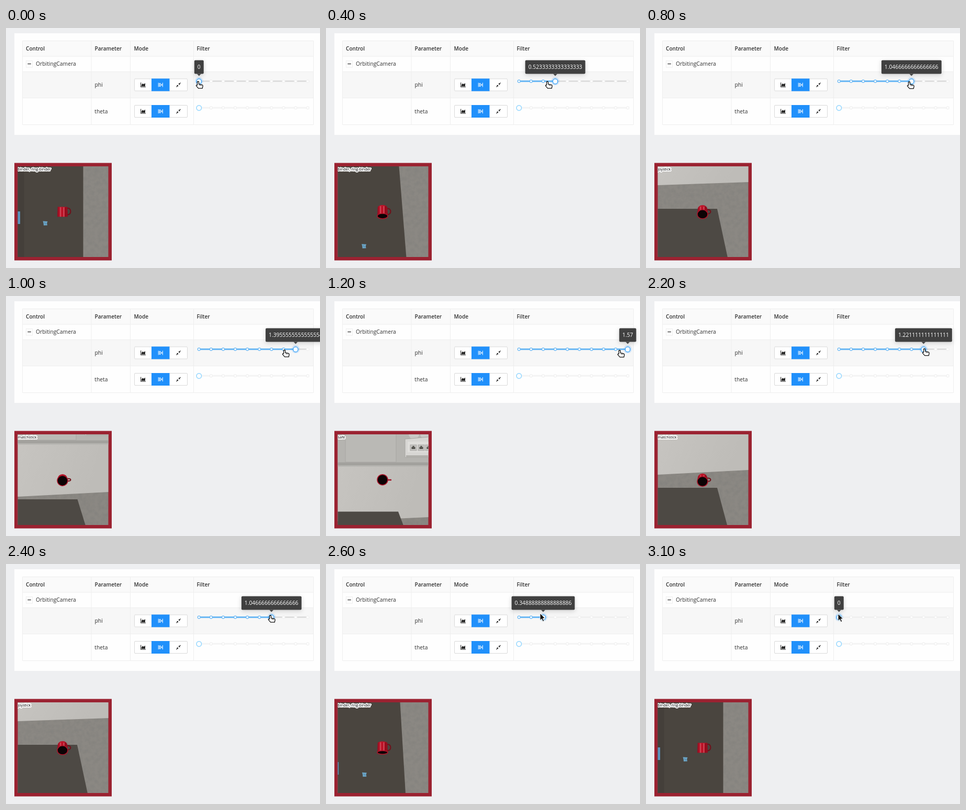
Recreate the animation shown at these times as an HTML page. Size 600x458 px, loop 3200 ms.

```html
<!DOCTYPE html>
<html lang="en">
<head>
<meta charset="utf-8">
<title>Orbiting camera filter</title>
<style>
  html, body { margin: 0; width: 100%; height: 100%; overflow: hidden; background: #eeeff1; }
  svg { display: block; width: 600px; height: 458px; }
  text { font: 10.3px "Open Sans", "Noto Sans", sans-serif; fill: #303030; }
  .head { font-size: 10.1px; font-weight: 600; }
  .tip { fill: #fff; text-anchor: middle; }
  .label { font-size: 7.2px; fill: #000; stroke: #fff; stroke-width: 3.6px; stroke-linejoin: round; paint-order: stroke; }
</style>
</head>
<body>
<svg id="stage" viewBox="0 0 600 458">
  <defs>
    <clipPath id="view"><rect x="22.5" y="264" width="173" height="173"/></clipPath>
    <filter id="grain" x="0" y="0" width="100%" height="100%">
      <feTurbulence type="fractalNoise" baseFrequency=".13" numOctaves="3" seed="4"/>
      <feColorMatrix values="0 0 0 0 .2  0 0 0 0 .2  0 0 0 0 .19  1.6 0 0 0 -.62"/>
    </filter>
    <filter id="shadow" x="-40%" y="-40%" width="180%" height="200%">
      <feDropShadow dx="0" dy="2.5" stdDeviation="4" flood-opacity=".16"/>
    </filter>
    <linearGradient id="wall" x1="0" x2="1" y1="0" y2=".4">
      <stop offset="0" stop-color="#c8c6c2"/><stop offset="1" stop-color="#bebcb8"/>
    </linearGradient>
    <linearGradient id="mug">
      <stop offset="0" stop-color="#8f0d20"/><stop offset=".3" stop-color="#c3162b"/>
      <stop offset=".7" stop-color="#b51326"/><stop offset="1" stop-color="#8a0c1d"/>
    </linearGradient>
  </defs>
  <g id="page"></g>
  <g id="phi"></g>
  <g id="photo" clip-path="url(#view)"></g>
  <g id="tip" filter="url(#shadow)">
    <rect id="tipBox" y="61.5" height="26" rx="2" fill="#404040"/>
    <path id="tipArrow" fill="#404040"/>
    <text id="tipText" class="tip" y="77.9"></text>
  </g>
  <g id="cursor"></g>
</svg>
<script>
const $ = id => document.getElementById(id);
const FRAME = 100, LOOP = 3200;
const X0 = 368.8, GAP = 23.08, STEP = 0.17444444444444443;

// Slider position for every tenth of a second
const STEPS = '00123345678899999999987664211000';
// Pointer path: time, x, y
const PATH = [
  [0, 367, 102], [100, 369, 102], [600, 459, 102], [800, 503, 102.5], [1200, 561, 103.5],
  [1500, 594, 107], [1700, 595, 108], [2000, 578, 107], [2200, 532, 100.5],
  [2400, 505, 98], [2600, 409, 94], [2900, 367, 95], [3200, 367, 95]
];

const rect = (x, y, w, h, fill, more = '') =>
  `<rect x="${x}" y="${y}" width="${w}" height="${h}" fill="${fill}" ${more}/>`;
const path = (d, fill, more = '') => `<path d="${d}" fill="${fill}" ${more}/>`;
const line = (d, color, w = 1) => path(d, 'none', `stroke="${color}" stroke-width="${w}"`);
const oval = (x, y, rx, ry, fill, more = '') =>
  `<ellipse cx="${x}" cy="${y}" rx="${rx}" ry="${ry}" fill="${fill}" ${more}/>`;
const text = (x, y, s, cls = '') => `<text x="${x}" y="${y}" class="${cls}">${s}</text>`;

function modeButtons(y) {
  const m = y + 12;
  return rect(245.5, y + .5, 101, 23, '#fff', 'rx="1.5" stroke="#d9d9d9"') +
    rect(278, y, 34.5, 24, '#2090fb') +
    line(`M257.7 ${m - 4.5}V${m + 4}H267`, '#222', 1.1) +
    path(`M259 ${m + 2.8}V${m}L261.3 ${m - 2.8}L263.3 ${m - 1}L266 ${m - 3.4}V${m + 2.8}Z`, '#222') +
    line(`M291.3 ${m - 4}V${m + 4}M299.3 ${m - 4}V${m + 4}M293.3 ${m - 3}H295V${m + 3}H293.3Z` +
      `M296.2 ${m}H298.6M297.4 ${m - 1.8}V${m + 1.8}`, '#fff', 1) +
    line(`M333.5 ${m - 4}L330.6 ${m - 1.1}M325.5 ${m + 4}L328.4 ${m + 1.1}`, '#222', 1.2) +
    path(`M330 ${m - 3.6}V${m - .5}H333.1ZM329 ${m + 3.6}V${m + .5}H325.9Z`, '#222');
}

function slider(y, k, rail, track, handle, halo) {
  let s = rect(X0, y - 1.5, 9 * GAP, 3, rail, 'rx="1.5"') +
    rect(X0, y - 1.5, k * GAP, 3, track);
  for (let i = 0; i < 10; i++) {
    const on = k > 0 && i <= k;
    s += oval(X0 + i * GAP, y, 2.5, 2.5, '#fff', `stroke="${on ? track : '#f0f0f0'}" stroke-width="1.3"`);
  }
  const x = X0 + k * GAP;
  if (halo) s += oval(x, y, 8, 8, '#1890ff', 'opacity=".15"');
  return s + oval(x, y + .3, 4.7, 4.9, '#fff', `stroke="${handle}" stroke-width="1.5"`);
}

function drawPage() {
  const heads = [[38, 'Control'], [169.5, 'Parameter'], [244.5, 'Mode'], [364.5, 'Filter']];
  $('page').innerHTML =
    rect(0, 0, 600, 458, '#eeeff1') +
    rect(16, 10, 584, 194, '#fefefe') +
    rect(31, 25, 557, 29, '#fafafa') +
    '<rect id="row" x="31" y="84" width="557" height="50"/>' +
    line('M31.5 24.5H587.5V184.5H31.5ZM31 54H588M31 83.5H588M31 133.5H588M163 24V184M237.5 24V184M358.5 24V184', '#eeeeee') +
    heads.map(([x, s]) => text(x, 42.8, s, 'head')).join('') +
    rect(38.5, 62.5, 12, 12.5, '#fff', 'stroke="#eeeeee"') +
    line('M41.3 68.5H47.8', '#222', 1.2) +
    text(57, 72.3, 'OrbitingCamera') +
    text(169.5, 112.4, 'phi') + text(169.3, 162.6, 'theta') +
    modeButtons(96.5) + modeButtons(147) +
    slider(152.3, 0, '#f4f4f4', '#91d5ff', '#91d5ff') +
    rect(16, 257.5, 186, 186, '#9b2231');
}

function mug(k) {
  const a = k * STEP, up = 9.5 * Math.cos(a), ry = 10 * Math.sin(a);
  const top = 350.7 - up, rim = 350.7 + up, x = 108;
  let s = k > 8
    ? line('M117 351H125', '#a11226', 2.6)
    : oval(118.5, 351 - up * .1, 5, 1.5 + up * .5, 'none', 'stroke="#701019" stroke-width="2"');
  s += path(`M${x - 9.3} ${top}A9.3 ${ry * .93} 0 0 1 ${x + 9.3} ${top}` +
    `L${x + 10} ${rim}A10 ${ry} 0 0 1 ${x - 10} ${rim}Z`, 'url(#mug)');
  if (k < 8) for (const dx of [-4, 2.5, 6]) {
    s += line(`M${x + dx} ${top + 1 - ry * .7}V${rim - ry * .6}`, dx > 5 ? '#5f0812' : '#e0949b', .8);
  }
  return s + oval(x, rim, 10, ry, '#0c0305', 'stroke="#ad1429" stroke-width="1.5"');
}

// Wall fittings, placed as seen from straight above
function fittings(k) {
  const socket = x => rect(x, 284, 12, 11, '#c3c2bf', 'stroke="#a09f9c" stroke-width=".8"') +
    path(`M${x + 2.5} 292V288H${x + 4.5}V286H${x + 7.5}V288H${x + 9.5}V292Z`, '#55544f');
  return `<g transform="translate(0 ${(k - 9) * 42})">` +
    rect(22, 200, 174, 118, '#b5b4b0') +
    rect(37, 200, 97, 117, '#bab9b5', 'stroke="#a5a4a0" stroke-width=".8"') +
    oval(168, 264, 10, 9, '#c9c8c5') + oval(189, 263, 9, 10, '#c9c8c5') +
    path('M151 273L196 269V308H151Z', '#d7d6d3', 'stroke="#a6a5a1"') +
    rect(153, 304, 43, 4, '#b0afab') +
    rect(156, 278, 40, 20, '#dfdedb') +
    socket(161) + socket(176) + socket(190) +
    rect(22, 317.5, 174, 5.5, '#a2a19d') + rect(22, 323, 174, 2.5, '#b4b3af') + '</g>';
}

function scene(k) {
  const label = k < 4 ? 'binder, ring-binder' : k < 7 ? 'joystick' : k < 9 ? 'matchstick' : 'safe';
  const floor = '#8b8883';
  let s = rect(22, 264, 174, 174, floor) +
    rect(22, 264, 174, 174, '#000', 'filter="url(#grain)" opacity=".55"');
  if (k > 5) {
    const left = [300, 341, 383, 430][k - 6], right = [294, 332, 374, 422][k - 6];
    s += path(`M22 200H196V${right}L22 ${left}Z`, 'url(#wall)');
    if (k > 7) s += fittings(k);
  }
  const near = [147.5, 149.8, 152, 153.5, 155, 155.7, 156, 155.3, 152, 148][k];
  const far = [147.5, 144.5, 141.5, 139.5, 138, 137, 136, 136, 136.5, 138][k];
  const edge = [264, 264, 264, 264, 294, 322, 345, 366, 388, 411.5][k];
  s += path(`M22 ${edge}H${far}L${near} 438H22Z`, k > 5 ? '#4d4944' : '#4a453f');
  if (!k) s += rect(22, 264, 12.5, 174, '#443f3a');
  if (k < 5) {
    const y = 372.5 + k * 14.6, x = 75 - k * .8;
    s += path(`M${x - 4.5} ${y - 4}L${x + 4.5} ${y - 3.5}L${x + 3.2} ${y}L${x + 4} ${y + 4}L${x - 3} ${y + 4.2}L${x - 3.4} ${y}Z`, '#6ba3c4') +
      line(`M${x - 2} ${y - 1}L${x + 2} ${y + 1.5}`, '#3f7394', .8);
  }
  if (k < 3) s += rect(22, 350 + k * 14, 5 - k * 1.4, 24, '#5c93bd');
  return s + mug(k) + text(22.5, 271.6, label, 'label');
}

const HAND = path('M-1.5 1Q0 -1 1.5 1V5.2L7.4 6.3Q9.3 6.8 9.1 8.8L8.2 13.2H.6L-3.5 8.4Q-3.8 6.2 -1.5 7.2Z',
  '#fff', 'stroke="#111" stroke-width="1.3" stroke-linejoin="round"') +
  line('M3.4 6V8.5M5.8 6.4V8.7', '#111', .8);
const ARROW = path('M0 0V13.6L3.2 10.7L5.4 15.7L7.8 14.6L5.6 9.8H9.7Z',
  '#111', 'stroke="#fff" stroke-width="1" stroke-linejoin="round"');

function pointer(t) {
  const i = PATH.findIndex(p => p[0] > t), a = PATH[i - 1], b = PATH[i];
  const f = (t - a[0]) / (b[0] - a[0]);
  return [a[1] + (b[1] - a[1]) * f, a[2] + (b[2] - a[2]) * f];
}

function showTip(k) {
  const x = X0 + k * GAP, value = $('tipText');
  value.textContent = k === 9 ? 1.57 : k * STEP;
  value.setAttribute('x', x);
  const w = value.getComputedTextLength() + 12;
  $('tipBox').setAttribute('x', x - w / 2);
  $('tipBox').setAttribute('width', w);
  $('tipArrow').setAttribute('d', `M${x - 4} 87.4H${x + 4}L${x} 91.4Z`);
}

let shownStep = -1;
function draw(t) {
  const k = +STEPS[t / FRAME];
  const outside = t >= 1400 && t <= 2000, arrow = t >= 2500;
  const near = !outside && !arrow;
  $('row').setAttribute('fill', outside ? '#fdfdfd' : '#f7f7f7');
  $('phi').innerHTML = slider(101.6, k, near ? '#dedede' : '#f0f0f0',
    outside ? '#91d0fb' : '#6bb8f4', '#45a8f8', true);
  if (k !== shownStep) {
    $('photo').innerHTML = scene(k);
    showTip(k);
    shownStep = k;
  }
  $('cursor').innerHTML = arrow ? ARROW : HAND;
  $('cursor').setAttribute('transform', `translate(${pointer(t)})`);
}

let last = -1;
function tick() {
  const t = Math.floor(performance.now() % LOOP / FRAME) * FRAME;
  if (t !== last) draw(last = t);
  requestAnimationFrame(tick);
}
drawPage();
tick();
</script>
</body>
</html>
```
